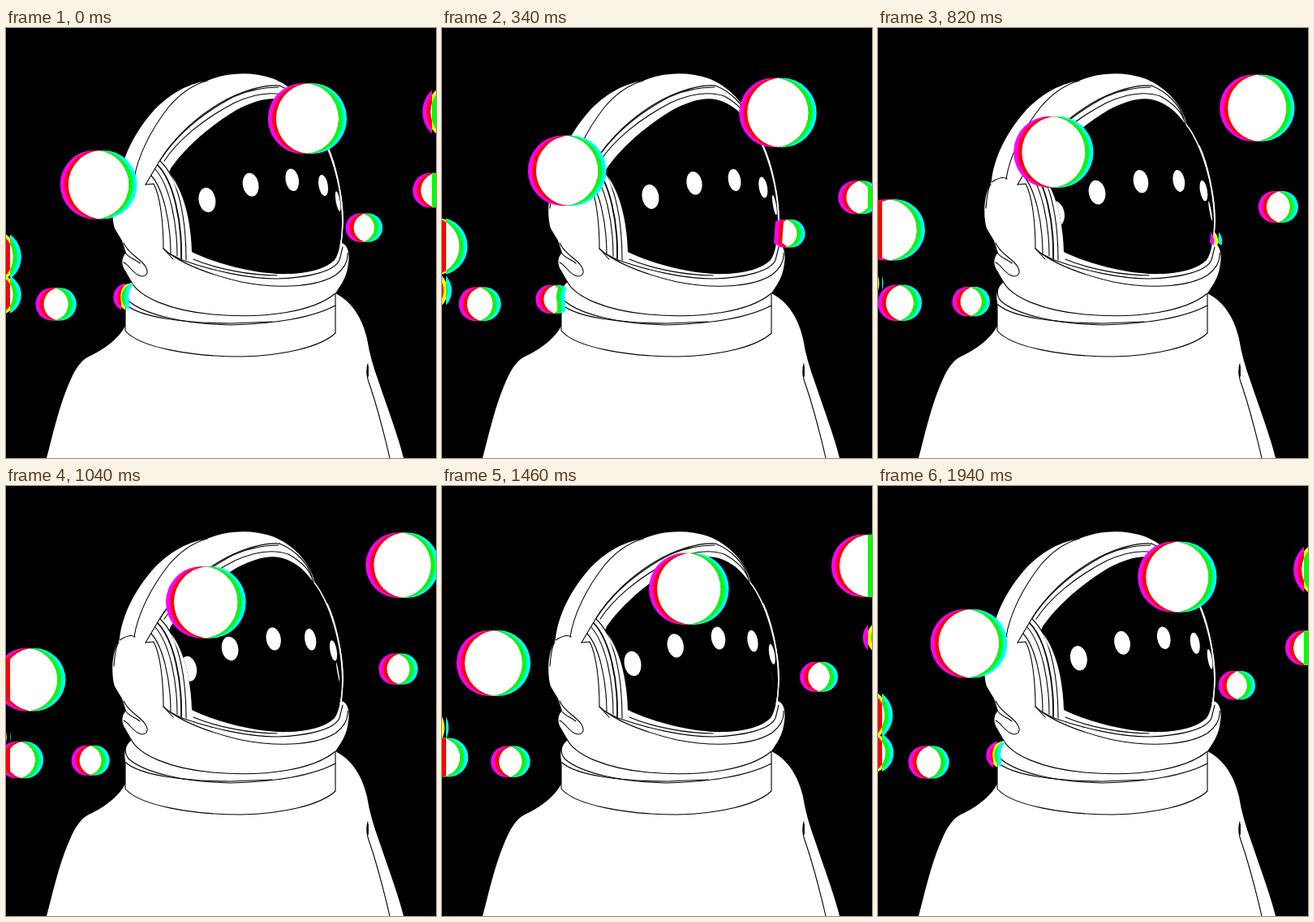
Write an HTML page that moves like this. It is 530 by 530 pixels and loops after 1960 ms.

```html
<!DOCTYPE html>
<html lang="en">
<head>
<meta charset="utf-8">
<title>Astronaut with orbiting lights</title>
<style>
  html, body { margin: 0; width: 100%; height: 100%; overflow: hidden; background: #000; }
  svg { display: block; width: 100vw; height: 100vh; }
  .ink { fill: none; stroke: #000; stroke-width: 1.1; stroke-linecap: round; stroke-linejoin: round; }
  .bold { stroke-width: 1.8; }
  .glint { fill: none; stroke: #fff; stroke-width: 1.2; stroke-linecap: round; }
</style>
</head>
<body>
<svg viewBox="0 0 530 530" fill="#fff">
  <defs>
    <clipPath id="stage"><path d="M0 0H530V530H0Z"/></clipPath>
    <clipPath id="behind"><path id="outside" clip-rule="evenodd"/></clipPath>
    <clipPath id="glass"><path id="glassShape"/></clipPath>
    <!-- Subtractive colour split: pairs multiply, the shared core turns white. -->
    <filter id="split" filterUnits="userSpaceOnUse" x="0" y="0" width="530" height="530" color-interpolation-filters="sRGB">
      <feOffset in="SourceAlpha" dx="-5" result="left"/>
      <feOffset in="SourceAlpha" dx="5" result="right"/>
      <feFlood flood-color="#f0f"/><feComposite in2="left" operator="in" result="magenta"/>
      <feFlood flood-color="#0ff"/><feComposite in2="right" operator="in" result="cyan"/>
      <feFlood flood-color="#ff0"/><feComposite in2="SourceAlpha" operator="in" result="yellow"/>
      <feBlend in="magenta" in2="yellow" mode="multiply" result="warm"/>
      <feBlend in="cyan" in2="warm" mode="multiply" result="mix"/>
      <feComposite in="SourceGraphic" in2="left" operator="in"/>
      <feComposite in2="right" operator="in" result="core"/>
      <feMerge><feMergeNode in="mix"/><feMergeNode in="core"/></feMerge>
    </filter>
  </defs>

  <rect width="530" height="530" fill="#000"/>
  <path id="figure"/>

  <!-- suit and neck ring -->
  <g class="ink">
    <path d="M147 340V373C164 394 230 405 290 405C342 404 388 393 406 376V328"/>
    <path d="M153 314C145 320 146 331 152 337C172 354 222 365 276 366C330 365 378 357 406 342"/>
    <path d="M148 341C166 357 222 364 278 364L328 362"/>
    <path d="M154 312C164 332 202 348 254 353C322 359 380 349 406 327"/>
    <path d="M446 414C443 425 446 434 449 442C457 466 466 500 473 530"/>
    <path class="bold" d="M446 417V429"/>
  </g>

  <!-- shell and ear piece -->
  <g class="ink">
    <path d="M158 186C162 159 178 126 200 98C215 80 230 70 248 65"/>
    <path d="M140 190C148 185 155 183 159 186M139 192C134 201 134 212 133 222"/>
    <path d="M145 265C151 279 166 284 172 294C177 303 172 308 164 305C156 302 152 292 145 289"/>
    <path d="M148 278C152 284 160 285 165 290"/>
    <path d="M172 193L188 166C205 137 235 108 272 88C298 75 318 70 337 71"/>
    <path d="M190 163C210 132 242 105 280 85C300 76 318 73 336 73"/>
    <path d="M195 164C211 139 243 112 282 92C308 80 330 78 348 84C366 94 376 105 379 119"/>
    <path d="M337 71C357 79 373 96 377 112"/>
  </g>

  <path id="visor" fill="#000"/>

  <!-- side panel and lower rim -->
  <g class="ink">
    <path d="M172 193L182 192C190 207 194 239 194 272L206 285"/>
    <path d="M179 182C193 197 203 237 203 279L217 286"/>
    <path d="M184 174C202 195 211 240 211 281"/>
    <path class="bold" d="M187 169C207 190 217 239 216 284"/>
    <path d="M190 164C211 183 222 230 222 286"/>
    <path d="M194 272C214 290 252 304 290 313C342 323 386 318 407 304C417 296 422 286 421 277"/>
    <path d="M217 286C254 299 298 309 334 309C372 308 405 300 411 286L415 270"/>
    <path d="M231 285C262 298 304 305 334 305"/>
  </g>
  <g class="glint">
    <path d="M222 148C230 137 240 129 250 123"/>
    <path d="M199 178C212 194 222 222 225 252"/>
    <path d="M396 145C406 166 415 205 415 238C415 250 414 260 412 268"/>
  </g>

  <g id="reflections" clip-path="url(#glass)"></g>
  <g filter="url(#split)">
    <g clip-path="url(#stage)">
      <g id="back" clip-path="url(#behind)"></g>
      <g id="front"></g>
    </g>
  </g>
</svg>
<script>
const LOOP = 1960;
const COUNT = 12;

const FIGURE = `M50 530C58 500 66 464 79 435C87 416 95 408 104 404C121 396 140 382 147 367V338
  C145 329 147 319 155 313L147 299C142 292 142 283 148 277L143 262L134 247C130 235 130 211 136 198
  L140 188C143 160 158 131 176 109C196 84 222 69 248 65C274 54 304 54 328 62C352 71 375 93 380 118
  C400 142 416 196 416 238L414 265C423 269 424 280 421 296C419 308 412 318 406 327
  C426 337 439 357 445 383C448 402 453 419 460 438C470 468 482 499 490 530Z`;
const VISOR = `M203 173C218 151 246 124 284 101C308 88 330 83 347 91C361 97 371 107 379 119
  C399 144 414 196 414 238C414 260 411 278 405 286C391 300 362 304 333 303
  C298 301 258 290 229 276C228 244 222 205 201 178Z`;

const $ = id => document.getElementById(id);
$('figure').setAttribute('d', FIGURE);
$('outside').setAttribute('d', 'M0 0H530V530H0Z' + FIGURE);
$('visor').setAttribute('d', VISOR);
$('glassShape').setAttribute('d', VISOR);

function add(parent, tag) {
  const node = document.createElementNS('http://www.w3.org/2000/svg', tag);
  return $(parent).appendChild(node);
}

function set(node, values) {
  for (const name in values) node.setAttribute(name, values[name]);
}

// A tilted circular orbit in perspective; place counts light spacings.
function orbit(place) {
  const angle = place * 2 * Math.PI / COUNT;
  const c = Math.cos(angle), s = Math.sin(angle);
  const depth = 1 - 0.314 * c - 0.357 * s;
  return {
    cx: (283.1 - 296.9 * c + 73.4 * s) / depth,
    cy: (258.4 - 65 * c - 192 * s) / depth,
    r: 23.3 / depth
  };
}

// The lights mirrored in the curved glass, thinning towards its right edge.
function mirror(place) {
  const cx = 288 + 122 * Math.sin(0.447 * (place - 1.75));
  const cy = 187.2 + 6.4 * (place - 2.97) ** 2;
  return {
    cx, cy,
    rx: Math.max(0, 10.3 * Math.cos(0.33 * (place - 1))),
    ry: 16 - 0.7 * place,
    transform: `rotate(-10 ${cx} ${cy})`
  };
}

const lights = Array.from({ length: COUNT }, (_, k) =>
  add(k >= 5 && k <= 10 ? 'back' : 'front', 'circle'));
const reflections = Array.from({ length: 6 }, () => add('reflections', 'ellipse'));

function draw(phase) {
  lights.forEach((node, k) => set(node, orbit(k + phase)));
  reflections.forEach((node, k) => set(node, mirror(k + phase)));
}

const start = performance.now();
function tick() {
  draw((performance.now() - start) % LOOP / LOOP);
  requestAnimationFrame(tick);
}
tick();
</script>
</body>
</html>
```
